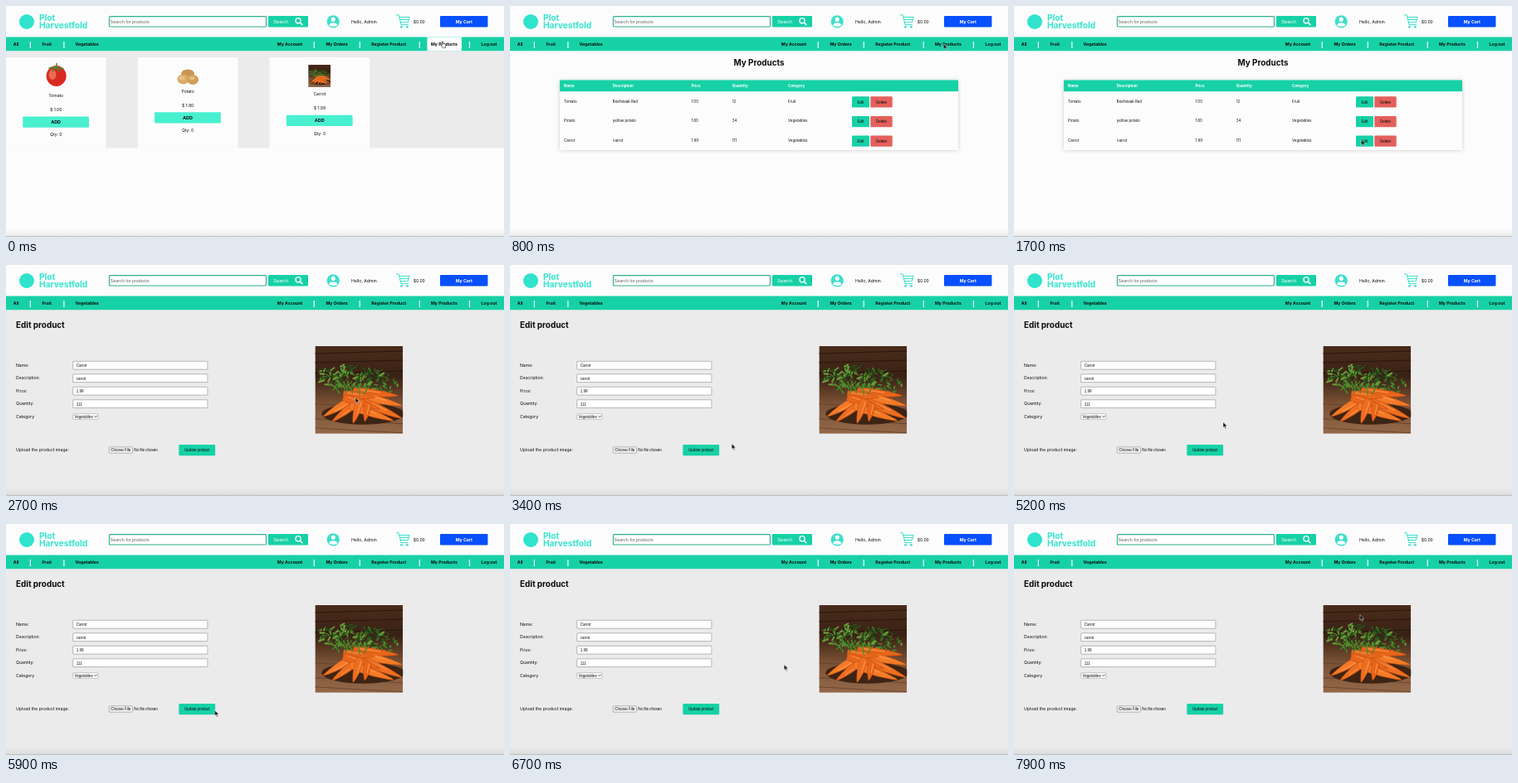
An HTML page that plays this animation: 600 px wide and 279 px high, repeating every 8000 ms.

```html
<!DOCTYPE html>
<html lang="en">
<head>
<meta charset="utf-8">
<title>Product admin</title>
<style>
  html, body { margin: 0; width: 100%; height: 100%; overflow: hidden; background: #fcfcfc; }
  svg { display: block; width: 100vw; height: 100vh; }
  text { font-family: Inter, Roboto, sans-serif; fill: #0c0c0c; }
  .ui { font-family: "Liberation Sans", Arial, sans-serif; }
  .b { font-weight: 700; }
  .w { fill: #fff; }
  .mid { text-anchor: middle; }

  .scene, .hover, .hand, .arrow, .cursor { animation: 8s step-end infinite; }
  #list { animation-name: list; }
  #table { animation-name: table; }
  #edit { animation-name: edit; }
  .hover, .hand { animation-name: over; }
  .arrow { animation-name: away; }
  .cursor { animation-name: move; animation-timing-function: ease-in-out; }

  @keyframes list { 0% { visibility: visible } 7.5%, 100% { visibility: hidden } }
  @keyframes table { 0% { visibility: hidden } 7.5% { visibility: visible } 27.5%, 100% { visibility: hidden } }
  @keyframes edit { 0% { visibility: hidden } 27.5%, 100% { visibility: visible } }
  @keyframes over { 0% { visibility: visible } 10%, 100% { visibility: hidden } }
  @keyframes away { 0% { visibility: hidden } 10%, 100% { visibility: visible } }
  @keyframes move {
    0%, 8.75% { transform: translate(525px, 42.5px) }
    20%, 28.75% { transform: translate(418.5px, 161.5px) }
    33.75% { transform: translate(421px, 160px) }
    45% { transform: translate(250px, 222px) }
    52.5% { transform: translate(227px, 241.5px) }
    56.25% { transform: translate(234px, 223px) }
    65% { transform: translate(252px, 189.7px) }
    72.5% { transform: translate(248px, 226px) }
    78.75% { transform: translate(290px, 214px) }
    83.75%, 85% { transform: translate(330.3px, 169.7px) }
    98.75%, 100% { transform: translate(416.8px, 109.5px) }
  }
</style>
</head>
<body>
<svg id="stage" viewBox="0 0 600 279" preserveAspectRatio="none"></svg>
<script>
const TEAL = '#17d1a6', MINT = '#48f0d0', GREY = '#ecebec', PAPER = '#fcfcfc';

let seed = 11;
const rnd = () => (seed = (seed * 16807) % 2147483647) / 2147483647;
const between = (a, b) => a + (b - a) * rnd();

const rect = (x, y, w, h, fill, extra = '') =>
  `<rect x="${x}" y="${y}" width="${w}" height="${h}" fill="${fill}" ${extra}/>`;
const ellipse = (x, y, rx, ry, fill) =>
  `<ellipse cx="${x}" cy="${y}" rx="${rx}" ry="${ry}" fill="${fill}"/>`;
const line = (d, color, width) =>
  `<path d="${d}" fill="none" stroke="${color}" stroke-width="${width}" stroke-linecap="round" stroke-linejoin="round"/>`;
// y is the middle of the line of text
const text = (x, y, str, size, cls = '') =>
  `<text x="${x}" y="${y + size * 0.36}" font-size="${size}" class="${cls}">${str}</text>`;
const button = (x, y, w, h, fill, str, size, cls) =>
  rect(x, y, w, h, fill, 'rx="1.2"') + text(x + w / 2, y + h / 2, str, size, 'mid ' + cls);

function carrot(x1, y1, x2, y2, w, fill) {
  const len = Math.hypot(x2 - x1, y2 - y1);
  const ux = (x2 - x1) / len, uy = (y2 - y1) / len;
  const at = (along, side) =>
    `${(x1 + ux * along * len - uy * side * w).toFixed(1)} ${(y1 + uy * along * len + ux * side * w).toFixed(1)}`;
  return `<path d="M${at(0, -.7)} C${at(.15, -1.3)} ${at(.7, -.8)} ${at(1, -.1)} L${at(1, .1)}
    C${at(.7, .8)} ${at(.15, 1.3)} ${at(0, .7)} Z" fill="${fill}" stroke="#b64a12" stroke-width=".5"/>`
    + line(`M${at(.12, -.4)} L${at(.6, -.3)}`, '#ffa45c', .8);
}

// 106 x 106 picture of a bunch of carrots on wooden boards
function carrotPicture() {
  let s = rect(0, 0, 106, 106, 'url(#wood)');
  for (const y of [9, 20, 33]) s += line(`M0 ${y} L106 ${y - 3}`, '#2a170e', 1);
  for (const y of [70, 88, 99]) s += line(`M0 ${y} L106 ${y + 6}`, '#5b3a24', .7);
  s += ellipse(58, 82, 50, 13, '#3d2414');
  for (let i = 0; i < 210; i++) {
    const a = between(0, 6.28), r = Math.sqrt(rnd());
    const x = 50 + Math.cos(a) * r * 50, y = 41 + Math.sin(a) * r * 17 + (x - 50) * .12;
    s += line(`M${x.toFixed(1)} ${y.toFixed(1)} l${between(-5, 5).toFixed(1)} ${between(-4, 4).toFixed(1)}`,
      ['#2d5a1c', '#4a8228', '#6a9f3c', '#24471a'][i % 4], between(1, 2.4).toFixed(1));
  }
  const bunch = [
    [46, 54, 100, 60, 5], [56, 60, 105, 72, 5], [58, 67, 104, 87, 5], [34, 58, 72, 62, 5],
    [42, 66, 10, 85, 4.5], [48, 70, 21, 91, 4.5], [34, 62, 78, 76, 5], [42, 72, 94, 90, 5],
    [55, 64, 46, 93, 5], [64, 68, 60, 91, 4.5]
  ];
  bunch.forEach((c, i) => s += carrot(...c, ['#e8651a', '#f47a26', '#ee6e20'][i % 3]));
  for (let i = 0; i < 26; i++)
    s += line(`M${between(24, 62).toFixed(1)} ${between(46, 60).toFixed(1)} l${between(-5, 5).toFixed(1)} -5`, '#4f8a2c', 1.2);
  return s;
}

const defs = `<defs>
  <linearGradient id="wood" x2="0" y2="1">
    <stop offset="0" stop-color="#4a2c1b"/><stop offset=".35" stop-color="#3a2114"/>
    <stop offset=".65" stop-color="#7a5135"/><stop offset="1" stop-color="#94694a"/>
  </linearGradient>
  <linearGradient id="fade" x2="0" y2="1">
    <stop offset="0" stop-color="#888" stop-opacity="0"/><stop offset="1" stop-color="#888" stop-opacity=".14"/>
  </linearGradient>
  <filter id="soft" x="-5%" y="-20%" width="110%" height="140%"><feGaussianBlur stdDeviation="2.5"/></filter>
  <clipPath id="square"><path d="M0 0h106v106H0z"/></clipPath>
  <g id="carrots" clip-path="url(#square)">${carrotPicture()}</g>
</defs>`;

function header() {
  const teal = '#3cdfcb';
  let s = rect(0, 0, 600, 38, PAPER) + ellipse(25, 19, 9, 9, '#2fe3cc');
  s += `<g style="--c:${teal}">` + ['Plot', 'Harvestfold'].map((str, i) =>
    text(40, 14.4 + i * 9, str, 10.2, 'b').replace('<text', '<text style="fill:#35e6cf"')).join('') + '</g>';
  s += rect(124.4, 12.6, 189, 12.4, '#fff', 'rx="1" stroke="#2fae8e" stroke-width="1.1"');
  s += text(125.6, 18.8, 'Search for products', 5.4, 'ui').replace('<text', '<text style="fill:#666"');
  s += rect(316, 12, 48, 13.5, TEAL, 'rx="1.2"') + text(322.3, 18.9, 'Search', 5.6, 'ui w');
  s += `<circle cx="352" cy="17.8" r="3.1" fill="none" stroke="#fff" stroke-width="1.3"/>`
    + line('M354.4 20.2 L356.8 22.6', '#fff', 1.6);
  s += ellipse(394.2, 18.8, 7.6, 7.6, teal) + ellipse(394.2, 16.3, 2.5, 2.7, '#fff')
    + `<path d="M389 23.6 Q389.4 20.2 394.2 20.2 Q399 20.2 399.4 23.6 Q394.2 26.4 389 23.6Z" fill="#fff"/>`;
  s += text(416, 18.9, 'Hello, Admin', 5.15);
  s += line('M470.3 10.8 H473.2 L476 22.6 H484.4 M473.8 13.4 H486 L484.2 19.6 H475.2 M474.6 16.5 H485', teal, 1)
    + ellipse(476.6, 25.3, 1.4, 1.4, teal) + ellipse(483.4, 25.3, 1.4, 1.4, teal);
  s += text(490.8, 18.9, '$0.00', 5.05);
  return s + button(523, 12, 57.5, 13.5, '#0850fb', 'My Cart', 5.2, 'b w');
}

function nav() {
  const items = [[8.8, 'All'], [43.4, 'Fruit'], [83.4, 'Vegetables'], [326.8, 'My Account'],
    [385.4, 'My Orders'], [440.2, 'Register Product'], [512, 'My Products'], [572.6, 'Log out']];
  let s = rect(0, 37.5, 600, 16.7, TEAL);
  for (const x of [28.7, 69.2, 370.6, 425.6, 497.6, 557.8]) s += rect(x, 43, 1.3, 8, '#e3fbf4');
  s += `<g class="hover">${rect(507.5, 37.5, 41.5, 16.7, PAPER)}</g>`;
  return s + items.map(([x, str]) => text(x, 45.8, str, 5.15, 'b')).join('');
}

function list() {
  const card = (x, y, name, price) => {
    const mid = x + 60.3;
    return rect(x, 62, 120.5, 109.3, PAPER)
      + text(mid, y, name, 5, 'mid') + text(mid, y + 17, '$ ' + price, 5, 'mid')
      + button(x + 20.2, y + 25.3, 79.8, 13.2, MINT, 'ADD', 5.4, 'b')
      + text(mid, y + 47.3, 'Qty: 0', 5, 'mid');
  };
  let s = rect(0, 54, 600, 117.3, GREY);
  s += card(0, 108.2, 'Tomato', '1.00') + card(158.8, 103, 'Potato', '1.80') + card(317.6, 106.4, 'Carrot', '1.99');
  s += ellipse(60.6, 84.5, 12, 12.5, '#d92a20') + ellipse(56, 83, 4.5, 6, '#ee6a55')
    + line('M60.5 73.5 L52 75 M60.5 73.5 L69 76 M60.5 73.5 L56 79 M60.5 73.5 L64 79 M60.5 73.5 L61 69.5', '#4d8a34', 1.6);
  s += ellipse(219, 82, 8, 5.5, '#c9964f') + ellipse(213.5, 88.5, 7.2, 6, '#d9ac68')
    + ellipse(225, 89, 7, 6, '#cf9f58') + ellipse(212, 86.8, 3.5, 2.4, '#e6c48a')
    + ellipse(224, 87, 3.4, 2.3, '#e2bd80');
  return s + '<use href="#carrots" transform="translate(364.2 71) scale(.254)"/>';
}

function table() {
  const cols = [65, 123.8, 218.4, 267.8, 335];
  const row = (cells, y, cls) => cells.map((c, i) => text(cols[i], y, c, 4.45, cls)).join('');
  const rows = [
    ['Tomato', 'Beefsteak Red', '1.00', '12', 'Fruit'],
    ['Potato', 'yellow potato', '1.80', '34', 'Vegetables'],
    ['Carrot', 'carrot', '1.99', '111', 'Vegetables']
  ];
  let s = rect(0, 54, 600, 225, PAPER) + text(300, 68.2, 'My Products', 9.9, 'mid b');
  s += rect(60, 90, 480, 84, '#000', 'opacity=".2" filter="url(#soft)"') + rect(60, 89.5, 480, 84.5, PAPER)
    + rect(60, 89.5, 480, 13.7, TEAL) + row(['Name', 'Description', 'Price', 'Quantity', 'Category'], 96.4, 'b w');
  rows.forEach((cells, i) => {
    const y = 115 + i * 23.6;
    s += row(cells, y) + button(412, y - 5.7, 21, 13.3, TEAL, 'Edit', 4.5, 'ui')
      + button(434.3, y - 5.7, 26.4, 13.3, '#e4605d', 'Delete', 4.5, 'ui');
  });
  return s;
}

function edit() {
  let s = rect(0, 54, 600, 225, GREY) + text(12, 72.8, 'Edit product', 9.9, 'b');
  [['Name:', 'Carrot'], ['Description:', 'carrot'], ['Price:', '1.99'], ['Quantity:', '111']].forEach(([label, value], i) => {
    const y = 121.2 + i * 15.5;
    s += text(12, y - .3, label, 5.1)
      + rect(80.7, y - 4.9, 162.2, 9.8, '#fff', 'rx=".6" stroke="#8c8c8c" stroke-width=".6"')
      + text(84.8, y + .2, value, 4.5, 'ui');
  });
  s += text(12, 182.8, 'Category', 5.1)
    + rect(80.7, 179.8, 30.2, 6.6, '#fff', 'rx="1" stroke="#8c8c8c" stroke-width=".5"')
    + text(82.4, 183.1, 'Vegetables', 4.5, 'ui') + line('M106.6 182.3 L108.1 183.9 L109.6 182.3', '#222', .7);
  s += text(12, 222.8, 'Upload the product image:', 5.1)
    + rect(124.2, 219.8, 28.2, 7.4, '#f3f3f3', 'rx=".8" stroke="#777" stroke-width=".5"')
    + text(138.3, 223.5, 'Choose File', 4.5, 'ui mid') + text(154.3, 223.5, 'No file chosen', 4.5, 'ui');
  s += button(208.3, 217, 43.8, 13.2, TEAL, 'Update product', 4.45, 'ui');
  return s + '<use href="#carrots" transform="translate(372.4 98) scale(.998)"/>';
}

const scene = (id, body) => `<g id="${id}" class="scene">${body}</g>`;
const cursor = `<g class="cursor" stroke-linejoin="round">
  <path class="arrow" d="M0 0 V6.6 L1.5 5.3 L2.6 7.9 L3.7 7.4 L2.6 4.9 H4.7 Z" fill="#000" stroke="#fff" stroke-width=".5"/>
  <path class="hand" d="M.3 .6 Q1 -.2 1.6 .6 V3 Q2.4 2.5 2.9 3.2 Q3.7 2.9 4.1 3.6 Q5 3.5 5 4.4 L4.4 7.8 H1 L-1.2 4.7 Q-1 3.7 .3 4.7 Z" fill="#fff" stroke="#000" stroke-width=".6"/>
</g>`;

document.getElementById('stage').innerHTML = defs + rect(0, 0, 600, 279, PAPER)
  + scene('list', list()) + scene('table', table()) + scene('edit', edit())
  + header() + nav()
  + rect(0, 269, 600, 9, 'url(#fade)') + rect(0, 277.8, 600, 1.2, '#c2c2c2') + cursor;
</script>
</body>
</html>
```
